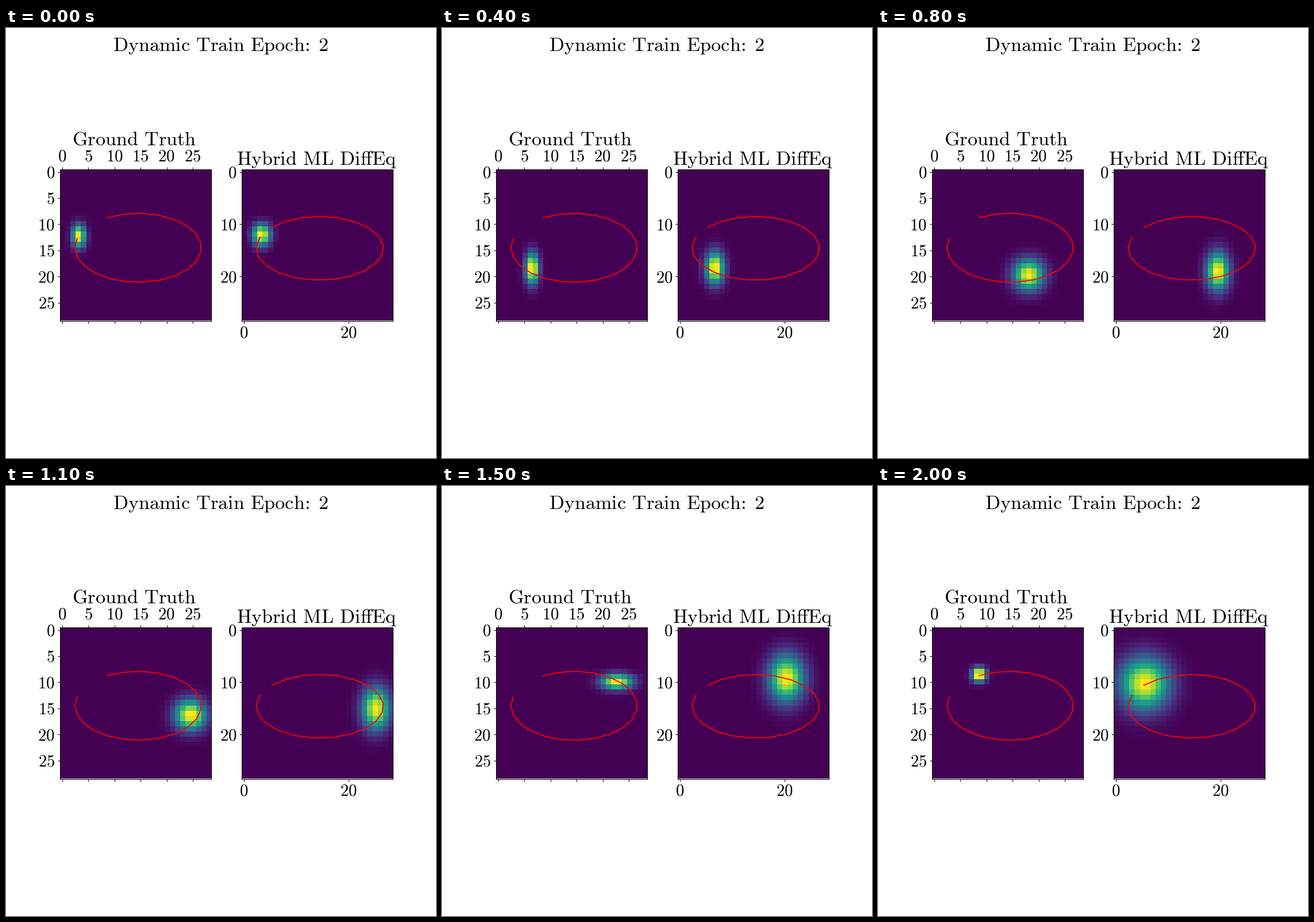
Animation, 748 px wide and 748 px high, one loop 2.1 s. Source, as a matplotlib script:

```python
import numpy as np
import matplotlib.pyplot as plt
from matplotlib.animation import FuncAnimation

plt.rcParams["mathtext.fontset"] = "cm"

SIZE, DPI, N, STEPS = 748, 100, 29, 21
SIDE, TOP = 263.5, 246
CELL = SIDE / N
TITLE, TICK = 34.2, 28.8

fig = plt.figure(figsize=(SIZE / DPI, SIZE / DPI), dpi=DPI, facecolor="white")


def label(x, y, text, px, ha="center"):
    """Roman text with its baseline at pixel (x, y)."""
    out = ""
    for word in text.split():
        if out:
            out += r"\hspace{%s}" % (0.5 if out.endswith(":}") else 0.38)
        out += r"\text{%s}" % word
    fig.text(x / SIZE, 1 - y / SIZE, f"${out}$", fontsize=px * 72 / DPI,
             ha=ha, va="baseline")


def panel(left, path, xticks, yticks, top):
    ax = fig.add_axes([left / SIZE, 1 - (TOP + SIDE) / SIZE, SIDE / SIZE, SIDE / SIZE])
    img = ax.imshow(np.zeros((N, N)), cmap="viridis", vmin=0, vmax=1,
                    interpolation="nearest")
    ax.plot(*path.T, color="red", lw=1.3)
    ax.set(xlim=(-0.5, N - 0.5), ylim=(N - 0.5, -0.5), xticks=xticks, yticks=yticks)
    ax.tick_params(top=top, labelbottom=False, labelleft=False, length=3.1, width=0.75)
    for spine in ax.spines.values():
        spine.set_linewidth(0.75)
    for t in xticks:
        label(left + (t + 0.5) * CELL - 0.5, 232 if top else 538.5, str(t), TICK)
    for t in yticks:
        label(left - 8.5, TOP + (t + 0.5) * CELL + 10, str(t), TICK, "right")
    return img


def orbit(degrees, centre, radii):
    a = np.radians(degrees)
    return np.array(centre) + np.column_stack([-np.cos(a), np.sin(a)]) * radii


def spot(centre, spread):
    """Gaussian on the pixel grid, scaled to a peak of one."""
    gx, gy = (np.exp(-0.5 * ((grid - 0.45 - 0.934 * c) / s) ** 2)
              for c, s in zip(centre, spread))
    field = np.outer(gy, gx)
    return field / field.max()


grid = np.arange(N)
step = np.arange(STEPS)
u = step / (STEPS - 1)

true_path = orbit(-15.4 + 15.73 * step, (14.5, 14.5), (12.1, 6.6))
model_path = orbit(-20.3 + 17.6 * step - 0.0325 * step**2, (14.48, 14.6), (12.19, 6.09))

# Spread depends on position on the left and grows with time on the right
true_spread = 0.86 + 1.16 / (1 + np.exp((12.7 - true_path) / 1.4))
model_spread = np.column_stack([1.15 + 2.05 * u**2, 1.4 + 1.95 * u**0.65])

label(373.5, 40.5, "Dynamic Train Epoch: 2", TITLE)
label(223.5, 203.5, "Ground Truth", TITLE)
# The registered sign's slot holds the ff ligature in Computer Modern
label(540.5, 238.5, "Hybrid ML Di\u00aeEq", TITLE)

views = [
    (panel(93.5, true_path, range(0, N, 5), range(0, N, 5), True), true_path, true_spread),
    (panel(409.7, model_path, [0, 20], [0, 10, 20], False), model_path, model_spread),
]


def update(i):
    for img, path, spread in views:
        img.set_data(spot(path[i], spread[i]))
    return [view[0] for view in views]


anim = FuncAnimation(fig, update, frames=STEPS, interval=100, repeat=True, repeat_delay=0)
plt.show()
```
